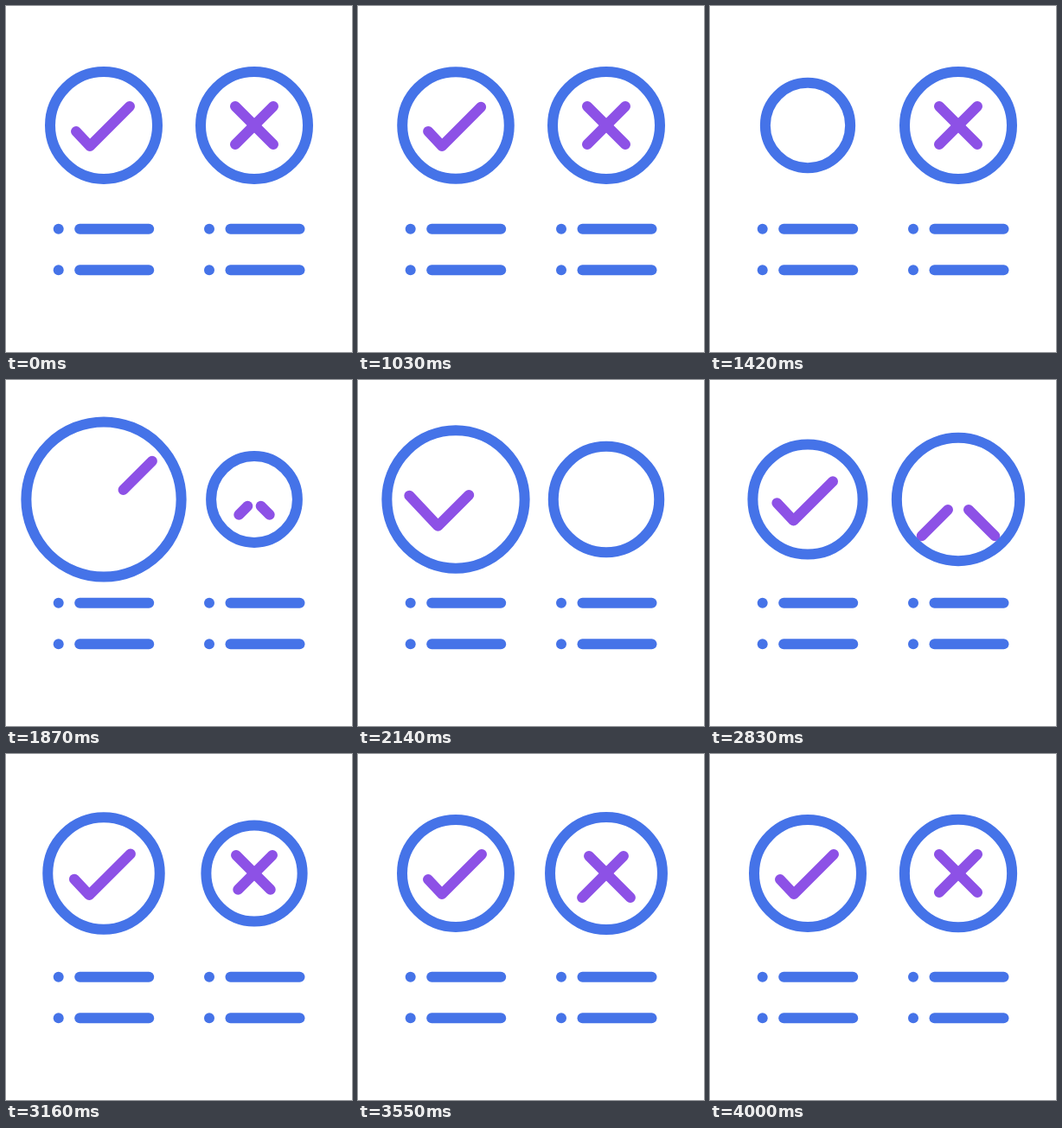
An HTML page with a canvas that plays this animation: 400 by 400 pixels, repeating every 4.03 s.

```html
<!DOCTYPE html>
<html lang="en">
<head>
<meta charset="utf-8">
<title>Pros and cons</title>
<style>
  html, body { margin: 0; width: 100%; height: 100%; overflow: hidden; background: #fff; }
  canvas { display: block; width: 400px; height: 400px; }
</style>
</head>
<body>
<canvas id="stage"></canvas>
<script>
const LOOP = 4030, HOLD = 1030, STEP = 30;
const RADIUS = 62, WIPE = 380;
const BLUE = '#4573e8', PURPLE = '#8d51e6';

const canvas = document.getElementById('stage');
const dpr = window.devicePixelRatio || 1;
canvas.width = canvas.height = 400 * dpr;
const ctx = canvas.getContext('2d');
ctx.scale(dpr, dpr);
ctx.lineWidth = 12;
ctx.lineCap = ctx.lineJoin = 'round';

const clamp = x => Math.min(1, Math.max(0, x));
const mix = (a, b, k) => a + (b - a) * k;

// Cubic easing with flat ends; a and b are the handle positions
function ease(x, a = 0.42, b = 0.58) {
  let lo = 0, hi = 1, u = 0.5;
  for (let i = 0; i < 24; i++) {
    u = (lo + hi) / 2;
    const px = 3 * (1 - u) * (1 - u) * u * a + 3 * (1 - u) * u * u * b + u * u * u;
    if (px < x) lo = u; else hi = u;
  }
  return u * u * (3 - 2 * u);
}

// Eases through turning points given as [time, value]
function swing(t, turns) {
  let [from, value] = turns[0];
  for (const [to, next] of turns.slice(1)) {
    value = mix(value, next, ease(clamp((t - from) / (to - from))));
    from = to;
  }
  return value;
}

// The ring shrinks, pops out, then swings back to rest
function ringRadius(t, pop) {
  if (t < 345) return RADIUS - 15 * ease(clamp(t / 345));
  if (t < 950) return mix(RADIUS - 15, RADIUS + pop, ease((t - 345) / 605, 0.38, 0.14));
  return RADIUS + pop * swing(t, [[950, 1], [1460, -0.28], [1995, 0.14], [2430, 0]]);
}

// Drawn part of a mark: 0 and 1 are its resting ends
function span(t, { start, entry, gain }) {
  if (t < start + WIPE) return [ease(clamp((t - start) / WIPE)), 1];
  const settle = (begin, peak, rest, over, under, last) => swing(t - entry, [
    [begin, -0.45 * gain], [peak, rest + over * gain],
    [760, rest - under * gain], [1220, rest + last * gain], [1600, rest]
  ]);
  return [settle(90, 535, 0, 0.75, 0.05, 0.07), settle(0, 490, 1, 0.39, 0.05, 0.11)];
}

const tick = {
  x: 113, y: 138, start: 1000, entry: 1680, pop: 28, gain: 0.43,
  strokes(tail, head) {
    const bend = 46 / 62;
    const stops = tail < bend && head > bend ? [tail, bend, head] : [tail, head];
    return [stops.map(p => {
      const x = 30 - 62 * p;
      return [x, x > -16 ? 8 - x : 24 + (x + 16) * 17 / 16];
    })];
  }
};

const cross = {
  x: 287, y: 138, start: 1630, entry: 2275, pop: 24, gain: 1,
  strokes(tail, head) {
    return [-1, 1].map(side => [tail, head].map(p => {
      const s = 44 * p - 22;
      return [side * s, s];
    }));
  }
};

function polyline(points, color) {
  ctx.strokeStyle = color;
  ctx.beginPath();
  points.forEach(([x, y]) => ctx.lineTo(x, y));
  ctx.stroke();
}

function drawMark(mark, t) {
  const r = ringRadius(t - mark.start, mark.pop), k = r / RADIUS;
  const [tail, head] = span(t, mark);
  if (head - tail > 0.002) {
    for (const line of mark.strokes(tail, head)) {
      polyline(line.map(([x, y]) => [mark.x + x * k, mark.y + y * k]), PURPLE);
    }
  }
  ctx.strokeStyle = BLUE;
  ctx.beginPath();
  ctx.arc(mark.x, mark.y, r, 0, Math.PI * 2);
  ctx.stroke();
}

function drawList(x) {
  for (const y of [257.7, 305.2]) {
    ctx.fillStyle = BLUE;
    ctx.beginPath();
    ctx.arc(x, y, 6, 0, Math.PI * 2);
    ctx.fill();
    polyline([[x + 24.5, y], [x + 104.5, y]], BLUE);
  }
}

function draw(now) {
  let t = now % LOOP;
  t = t < HOLD ? 0 : HOLD + Math.floor((t - HOLD) / STEP) * STEP;
  ctx.fillStyle = '#fff';
  ctx.fillRect(0, 0, 400, 400);
  drawMark(tick, t);
  drawMark(cross, t);
  drawList(60.7);
  drawList(235);
}

let start = null;
function frame(now) {
  if (start === null) start = now;
  draw(now - start);
  requestAnimationFrame(frame);
}
draw(0);
requestAnimationFrame(frame);
</script>
</body>
</html>
```
